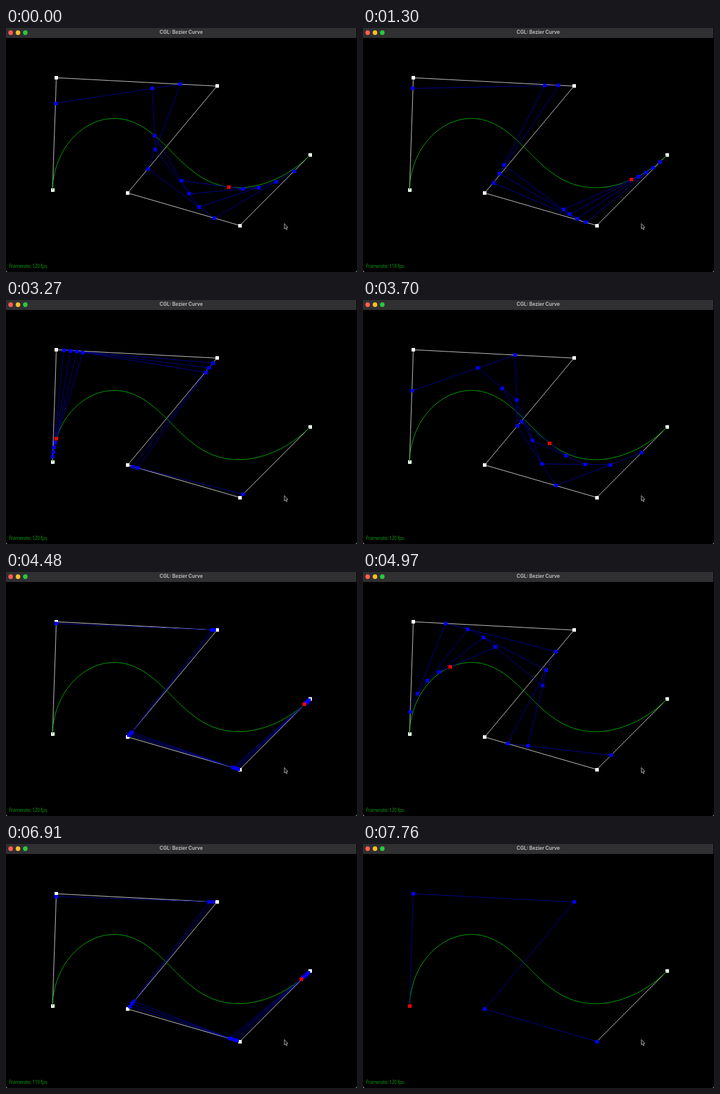
An HTML page with a canvas that plays this animation: 600x417 px, repeating every 8210 ms.

```html
<!DOCTYPE html>
<html lang="en">
<head>
<meta charset="utf-8">
<title>Bezier Curve</title>
<style>
  html, body { margin: 0; width: 100%; height: 100%; overflow: hidden; background: #999; }
  #win {
    position: relative; width: 600px; height: 417px; overflow: hidden;
    background: #000; border-radius: 0 0 4px 4px;
  }
  canvas, svg { position: absolute; left: 0; top: 0; }
  #bar {
    position: absolute; left: 0; top: 0; width: 599px; height: 16.5px; background: #302f31;
    color: #b9b9ba; font: 700 8.3px/15.5px Inter, sans-serif; text-align: center;
  }
  #fps {
    position: absolute; left: 5px; top: 401px; white-space: pre;
    color: #08960e; font: 8px/11px "Noto Sans", sans-serif; letter-spacing: -.3px;
  }
</style>
</head>
<body>
<div id="win">
  <canvas id="view" width="600" height="417"></canvas>
  <div id="bar">CGL: Bezier Curve</div>
  <div id="fps">Framerate: 120 fps</div>
  <svg width="600" height="417">
    <circle cx="8" cy="8" r="3.9" fill="#ff5f57"/>
    <circle cx="20.5" cy="8" r="3.9" fill="#febc2e"/>
    <circle cx="33" cy="8" r="3.9" fill="#28c840"/>
    <path d="M475.8 334.3V343.3L477.8 341.5L479.2 344.6L480.6 344L479.3 341H481.8Z"
          fill="#000" stroke="#ddd" stroke-width=".8" stroke-linejoin="round"/>
  </svg>
</div>
<script>
const LOOP = 8210, TICK = 30, FIRST = 0.773;
const ctrl = [[79.5, 277.2], [86, 85], [360.7, 99.3], [208, 282], [399.7, 337.5], [519.8, 217.2]];

// Scroll gestures, alternately up and down: start ms, ticks, skew of the easing
const scrolls = [
  [480, 36, 2.36], [1940, 28, 1.66], [3210, 31, 0.875],
  [4480, 26, 0.8], [5730, 27, 0.64], [6910, 14, 0.9]
];

const ctx = document.getElementById("view").getContext("2d");
const fps = document.getElementById("fps");

const mix = (a, b, t) => a + (b - a) * t;
const smooth = v => v * v * (3 - 2 * v);
const within = (ms, from, to) => ms >= from && ms < to;
const reduce = (pts, t) =>
  pts.slice(1).map((p, i) => [mix(pts[i][0], p[0], t), mix(pts[i][1], p[1], t)]);

function pointAt(t) {
  let pts = ctrl;
  while (pts.length > 1) pts = reduce(pts, t);
  return pts[0];
}

function paramAt(ms) {
  const n = scrolls.filter(s => s[0] <= ms).length - 1;
  if (n < 0) return FIRST;
  const [start, ticks, skew] = scrolls[n];
  const u = Math.min(1, (Math.floor((ms - start) / TICK) + 1) / ticks);
  return mix(n ? n % 2 : FIRST, (n + 1) % 2, smooth(u ** skew));
}

function rateAt(ms) {
  if (within(ms, 1300, 1730)) return 118;
  return within(ms, 6060, 7760) ? 119 : 120;
}

function line(pts, color) {
  ctx.strokeStyle = color;
  ctx.beginPath();
  pts.forEach(p => ctx.lineTo(p[0], p[1]));
  ctx.stroke();
}

function dots(pts, color) {
  ctx.fillStyle = color;
  pts.forEach(([x, y]) => ctx.fillRect(Math.round(x - 3), Math.round(y - 3), 6, 6));
}

const curve = Array.from({ length: 201 }, (_, i) => pointAt(i / 200));

function draw(ms) {
  const t = paramAt(ms);
  ctx.clearRect(0, 0, 600, 417);

  // At either end the blue hull hides the matching white edges
  const hull = t === 0 ? ctrl.slice(4) : t === 1 ? ctrl.slice(0, 2) : ctrl;
  line(hull, "#d4d4d4");
  dots(ctrl, "#fff");
  line(curve, "#00b800");

  const levels = [];
  for (let pts = reduce(ctrl, t); pts.length; pts = reduce(pts, t)) levels.push(pts);
  // Overlapping edges at the ends are stroked once
  const edges = t === 0 || t === 1 ? levels.slice(0, 1) : levels;
  edges.forEach(pts => line(pts, "#00009c"));
  levels.forEach(pts => dots(pts, pts.length > 1 ? "#00f" : "#f00"));

  fps.textContent = `Framerate: ${rateAt(ms)} fps`;
}

const begin = performance.now();
function frame() {
  draw((performance.now() - begin) % LOOP);
  requestAnimationFrame(frame);
}
frame();
</script>
</body>
</html>
```
